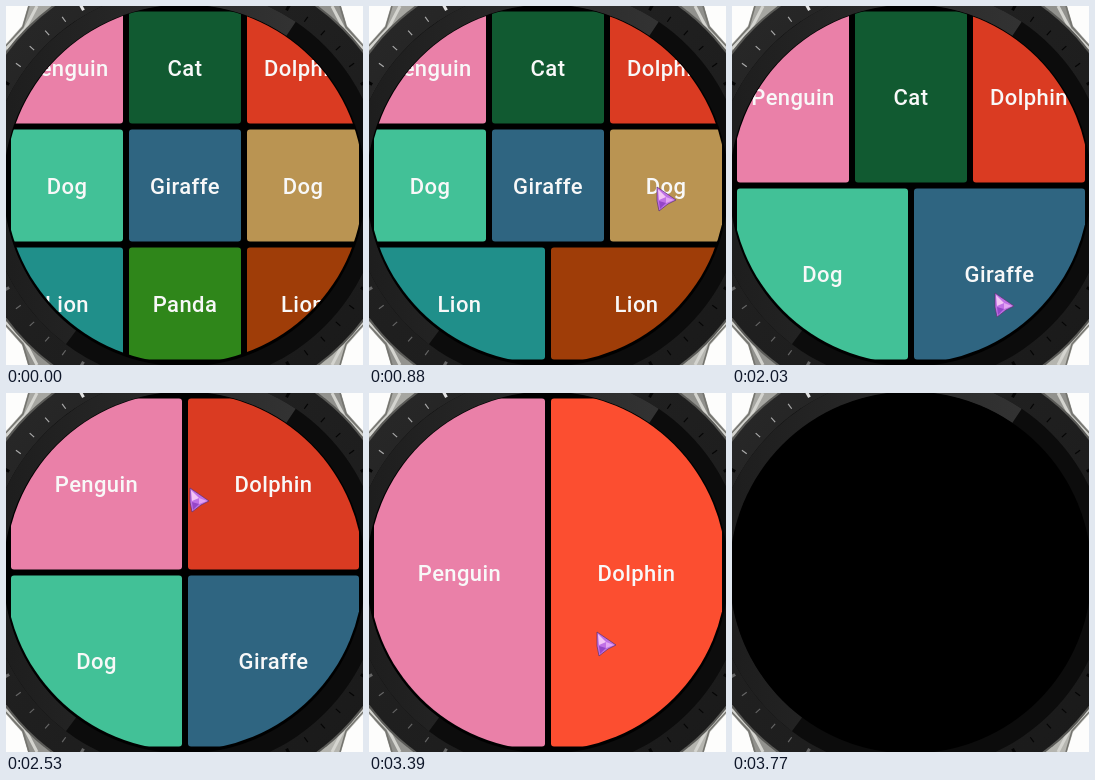
Animation, 357 px wide and 359 px high, one loop 3.95 s. Source, as an HTML page:

```html
<!DOCTYPE html>
<html lang="en">
<head>
<meta charset="utf-8">
<title>Watch tiles</title>
<style>
html, body { margin: 0; width: 100%; height: 100%; overflow: hidden; background: #fdfdfc; }
svg { display: block; }
text {
  fill: #f8f8f8; text-anchor: middle;
  font: 500 22px Roboto, sans-serif; letter-spacing: .4px;
}
.pressed rect { filter: sepia(.1) brightness(1.2); }
</style>
</head>
<body>
<svg width="357" height="359" fill="none">
  <defs>
    <linearGradient id="metal" x1="0" y1="0" x2="1" y2="1">
      <stop offset="0" stop-color="#a9a9a4"/>
      <stop offset=".5" stop-color="#8f8f8b"/>
      <stop offset="1" stop-color="#b9b9b3"/>
    </linearGradient>
    <linearGradient id="bezel" x1="0" y1="0" x2="1" y2="1">
      <stop offset="0" stop-color="#2b2b2b"/>
      <stop offset=".4" stop-color="#202020"/>
      <stop offset="1" stop-color="#191919"/>
    </linearGradient>
    <linearGradient id="shine">
      <stop offset="0" stop-color="#1d1d1d"/>
      <stop offset="1" stop-color="#323232"/>
    </linearGradient>
    <clipPath id="screen"><circle cx="178.3" cy="178.3" r="179.2"/></clipPath>
    <g id="lug">
      <path d="M0 0H22L16 20 0 38Z" fill="#fdfdfc"/>
      <path d="M23 0 17 21 0 40" stroke="#74746f" stroke-width="1.5"/>
      <path d="M31 0 19 23 0 43" stroke="#d4d4cf" stroke-width="3"/>
    </g>
  </defs>
  <rect width="357" height="359" fill="url(#metal)"/>
  <use href="#lug"/>
  <use href="#lug" transform="translate(357 0) scale(-1 1)"/>
  <use href="#lug" transform="translate(0 359) scale(1 -1)"/>
  <use href="#lug" transform="translate(357 359) scale(-1 -1)"/>
  <circle cx="179" cy="180" r="224" fill="#5a5a57"/>
  <circle cx="179" cy="180" r="222" fill="url(#bezel)"/>
  <circle cx="179" cy="180" r="198" fill="#0c0c0c"/>
  <g id="ticks"></g>
  <path id="sheen" stroke="url(#shine)" stroke-width="17"/>
  <circle cx="178.5" cy="179.5" r="181" fill="#000"/>
  <g id="face" clip-path="url(#screen)"></g>
  <g id="pointer">
    <path d="M0 0 19 13 11 17 2 24 0 14Z" fill="#c070e6" stroke="#5b3570" stroke-width=".7"/>
    <path d="M1 2 9 10 2 13Z" fill="#f3c4f6"/>
    <path d="M9 10 17 13 9 16Z" fill="#e3a3f3"/>
    <path d="M2 14 9 16 3 22Z" fill="#9446c8"/>
  </g>
</svg>
<script>
const LOOP = 3950, LEFT = 5, TOP = 5.5, SIZE = 348, GAP = 6;

function add(parent, name, attrs) {
  const el = document.createElementNS('http://www.w3.org/2000/svg', name);
  parent.append(el);
  return set(el, attrs);
}

function set(el, attrs) {
  for (const key in attrs) el.setAttribute(key, attrs[key]);
  return el;
}

// label, colour, row, time pressed, time removed
const tiles = [
  ['Penguin', '#ea80a8', 0, 3700, 3770],
  ['Cat', '#115a31', 0, 2470, 2530],
  ['Dolphin', '#da3b22', 0, 3390, 3480],
  ['Dog', '#42c197', 1, 3090, 3140],
  ['Giraffe', '#2f6581', 1, 2670, 2760],
  ['Dog', '#ba9452', 1, 970, 1060],
  ['Lion', '#208f8a', 2, 1900, 2030],
  ['Panda', '#2f861a', 2, 490, 620],
  ['Lion', '#9f3d08', 2, 1270, 1330]
].map(([name, fill, row, press, gone]) => {
  const group = add(face, 'g');
  const box = add(group, 'rect', { fill, rx: 3 });
  const label = add(group, 'text');
  label.textContent = name;
  return { group, box, label, row, press, gone };
});

// time, x, y: the pointer jumps from one stop to the next
const stops = [
  [50, 207, 177], [110, 205, 190], [180, 200, 215], [240, 194, 242],
  [300, 189, 265], [360, 186, 280], [430, 185, 288],
  [690, 205, 271], [760, 243, 232], [830, 278, 195], [880, 288, 181],
  [1140, 284, 197], [1210, 263, 287],
  [2280, 250, 248], [2350, 217, 168], [2410, 184, 95],
  [2580, 212, 182], [2670, 228, 239]
];

function polar(r, deg) {
  const a = deg * Math.PI / 180;
  return `${179 + r * Math.cos(a)} ${180 + r * Math.sin(a)}`;
}

function drawBezel() {
  for (let deg = 0; deg < 360; deg += 6) {
    const hour = deg % 30 === 0;
    const lit = deg > 212 && deg < 255, dim = deg > 110 && deg < 160;
    add(ticks, 'path', {
      d: `M${polar(203, deg)}L${polar(209, deg)}`,
      stroke: lit ? (hour ? '#e4e4e4' : '#aaa') : dim ? '#666' : '#050505',
      'stroke-width': hour ? 3 : 1.2
    });
  }
  set(sheen, { d: `M${polar(189.5, 127)}A189.5 189.5 0 0 1 ${polar(189.5, 304)}` });
}

function place({ box, label }, x, y, width, height) {
  set(box, { x, y, width, height });
  set(label, { x: x + width / 2, y: y + height / 2 + 8 });
}

const share = n => (SIZE - GAP * (n - 1)) / n;

function draw(t) {
  for (const { group, press, gone } of tiles) {
    group.style.display = t < gone ? '' : 'none';
    group.classList.toggle('pressed', t >= press);
  }
  const rows = [0, 1, 2]
    .map(r => tiles.filter(tile => tile.row === r && t < tile.gone))
    .filter(row => row.length);
  const h = share(rows.length);
  rows.forEach((row, j) => {
    const w = share(row.length);
    row.forEach((tile, i) => place(tile, LEFT + i * (w + GAP), TOP + j * (h + GAP), w, h));
  });

  const stop = stops.filter(s => s[0] <= t).pop();
  const shown = stop && rows.length;
  pointer.style.display = shown ? '' : 'none';
  if (shown) set(pointer, { transform: `translate(${stop[1]} ${stop[2]})` });
}

drawBezel();
draw(0);
const start = performance.now();
requestAnimationFrame(function tick(now) {
  draw(Math.max(0, now - start) % LOOP);
  requestAnimationFrame(tick);
});
</script>
</body>
</html>
```
